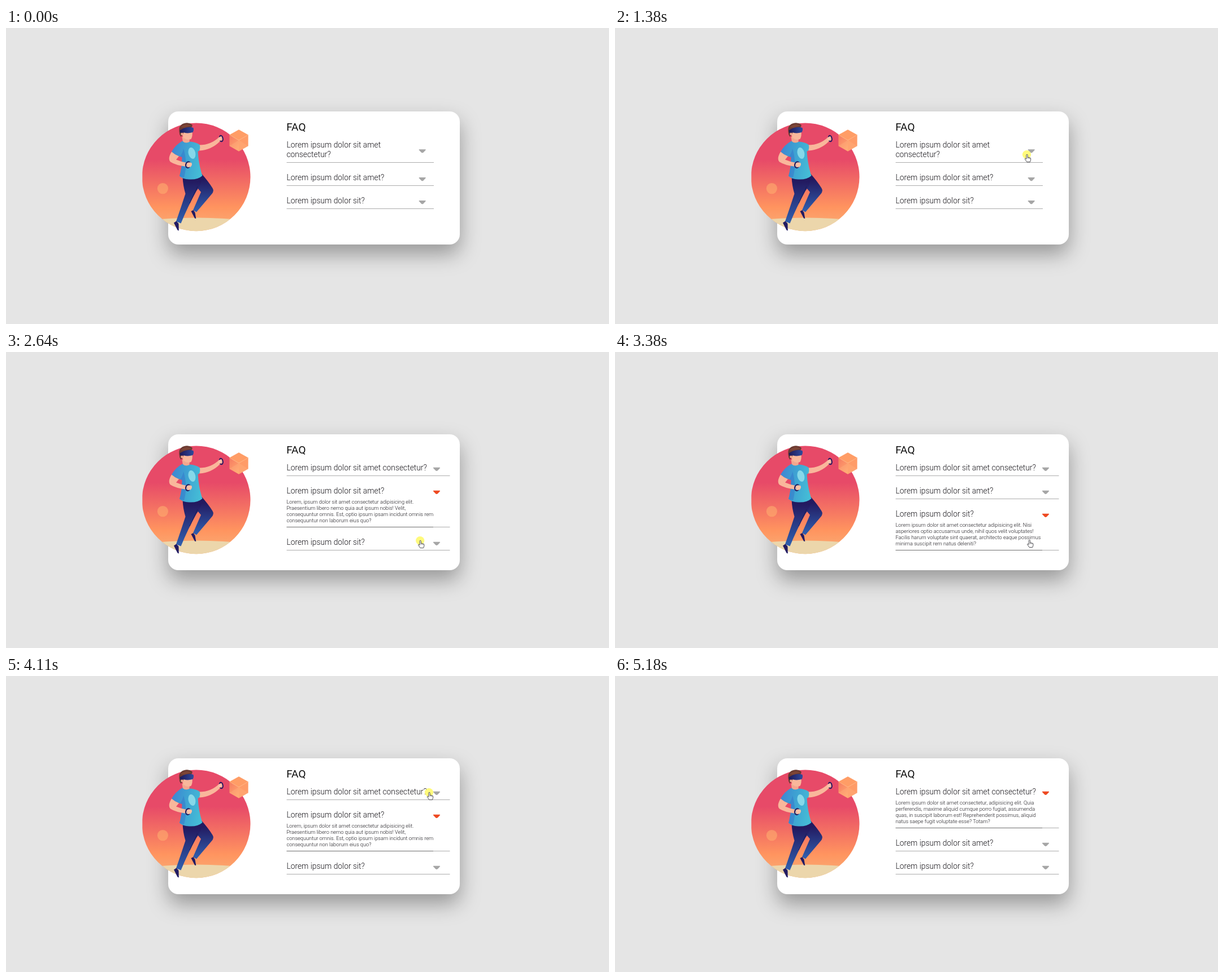
Recreate the animation shown at these times as an HTML page. Size 1067 by 525 pixels, loop 6.11 s.

```html
<!DOCTYPE html>
<html lang="en">
<head>
<meta charset="utf-8">
<title>FAQ accordion</title>
<style>
  html, body { margin: 0; width: 100%; height: 100%; overflow: hidden; background: #e5e5e5; }
  #card {
    position: absolute; left: 287.2px; width: 515.5px; border-radius: 18px;
    background: #fff; box-shadow: 0 17px 36px rgba(0, 0, 0, .34);
  }
  svg { position: absolute; left: 0; top: 0; display: block; }
  text { font-family: Roboto, "Open Sans", sans-serif; font-weight: 300; fill: #17151a; }
  .title { font-size: 19px; font-weight: 400; fill: #0c0c0c; }
  .ask { font-size: 13.82px; }
  .reply { font-size: 9.22px; }
</style>
</head>
<body>
<div id="card"></div>
<svg width="1067" height="525" viewBox="0 0 1067 525">
  <defs>
    <linearGradient id="sky" x1="0" y1="0" x2="0" y2="1">
      <stop offset=".34" stop-color="#e74a68"/><stop offset=".78" stop-color="#ff945f"/><stop offset="1" stop-color="#f9b078"/>
    </linearGradient>
    <linearGradient id="shirt" x1="0" y1=".3" x2="1" y2=".5">
      <stop offset="0" stop-color="#3f86d2"/><stop offset=".4" stop-color="#3d9fd2"/><stop offset="1" stop-color="#45bdd6"/>
    </linearGradient>
    <linearGradient id="legs" x1="0" y1="0" x2="0" y2="1">
      <stop offset=".15" stop-color="#231a60"/><stop offset="1" stop-color="#3060b0"/>
    </linearGradient>
    <linearGradient id="visor">
      <stop offset="0" stop-color="#1d1859"/><stop offset="1" stop-color="#304a9c"/>
    </linearGradient>
    <linearGradient id="side" x1="0" y1="0" x2=".6" y2="1">
      <stop offset="0" stop-color="#f67c62"/><stop offset="1" stop-color="#ffa56e"/>
    </linearGradient>
    <clipPath id="edge"><rect x="241.3" y="160" width="195" height="205"/></clipPath>
    <clipPath id="disc"><circle cx="336.6" cy="264.3" r="95.9"/></clipPath>
  </defs>

  <g id="art">
    <g clip-path="url(#edge)">
      <circle cx="336.6" cy="264.3" r="95.9" fill="url(#sky)"/>
      <ellipse cx="337" cy="357" rx="125" ry="20.5" fill="#ecd6ab" clip-path="url(#disc)"/>
      <circle cx="277.4" cy="284.6" r="9.6" fill="#ffb070" opacity=".57"/>
    </g>
    <!-- cube -->
    <path d="M412 180.3L428.6 189.6 412 199 395.4 189.6z" fill="#ff9d66"/>
    <path d="M395.4 189.6L412 199V218.8L395.4 209.3z" fill="url(#side)"/>
    <path d="M428.6 189.6L412 199V218.8L428.6 209.3z" fill="#ff9c68"/>
    <path d="M395.4 209.3L412 199 428.6 209.3 412 218.8z" fill="#ffbd86" opacity=".25"/>
    <path d="M395.4 189.6L412 199 428.6 189.6" fill="none" stroke="#ffb682" stroke-width=".7"/>
    <!-- legs and shoes -->
    <path d="M329 262L346.5 259Q358 272 365.5 284Q368.5 289 364.5 294L337 326.5 331 323 345 291 334 278z" fill="url(#legs)"/>
    <path d="M312.5 263Q330 271 346.5 259Q348 276 337 289Q322 316 309.5 346.5L301 343Q309 320 317.5 294Q313 279 312.5 263z" fill="url(#legs)"/>
    <path d="M339 281Q332 296 325 311" fill="none" stroke="#1b1856" stroke-width=".8"/>
    <path d="M297 345.5L301.5 342.5 305.5 347 305.8 359.5 303.5 358.5z" fill="#221b62"/>
    <path d="M327.5 325L331.5 323 334.5 327.5 336.3 338 334 337.5z" fill="#221b62"/>
    <!-- far arm -->
    <path d="M341 207.5Q362 208 377 193.5L382 192 383.5 198 378.5 201Q364 216 342.5 217.5z" fill="#f9b79b"/>
    <ellipse cx="380.7" cy="196" rx="3" ry="5.3" fill="none" stroke="#221b62" stroke-width="2" transform="rotate(-10 381 196)"/>
    <path d="M376 194.5Q379 191.5 381.5 194.5L380 199.5 376.5 200z" fill="#ffc4aa"/>
    <!-- torso -->
    <path d="M311.5 193L325 192 324.5 203Q319 208 313 202z" fill="#f3a78e"/>
    <path d="M312 200.5Q318 206 325.5 201.5Q337 202.500 342.5 207Q344.5 212 342 217.5L339.5 219Q341 243 347.5 262Q339 269.5 324 268.5Q312 268 307 262.5Q312 246 311.5 229L308 228Q300 226 293 219.5Q300 207 312 200.5z" fill="url(#shirt)"/>
    <path d="M308 228Q313 221 314 214Q322 240 315 265Q310 264 307 262.5Q312 246 311.5 229z" fill="#3574c9" opacity=".5"/>
    <ellipse cx="329" cy="222" rx="6.2" ry="10.2" fill="#86d8e9" transform="rotate(-14 329 222)"/>
    <!-- near arm -->
    <path d="M293 219.5Q299 225 306 227.500L301 233.500Q310 237.500 320 239L320 246Q300 243.500 291 237.500Q285.500 232 293 219.500z" fill="#f9b79b"/>
    <ellipse cx="322.3" cy="242.5" rx="4" ry="5.3" fill="none" stroke="#221b62" stroke-width="2.2" transform="rotate(18 322 242)"/>
    <path d="M320 240Q324 237 328.5 239.5Q330 243 326.5 246.5L321 247z" fill="#ffc0a6"/>
    <!-- head -->
    <path d="M311 183L329.5 183Q330.5 192 327.5 197Q320 200 313.5 194z" fill="#f9b79b"/>
    <path d="M306.5 184Q305 174 312.5 170Q322 166 329.5 171.5Q330.5 174 328 176.5L316 178 313.5 188 309.5 193Q306.5 189 306.5 184z" fill="#6a3a31"/>
    <path d="M309 176Q318 168 328 173L316 177z" fill="#7d4536"/>
    <path d="M307.5 181.5L315 177.5Q324 174.5 331.5 177Q333 181 330.5 185Q322 187.5 315 185.5L308.5 186z" fill="url(#visor)"/>
    <circle cx="311.5" cy="188" r="2.2" fill="#f3a78e"/>
  </g>

  <text id="title" class="title" x="496.2">FAQ</text>
  <g id="list"></g>
  <g id="cursor">
    <circle id="halo" r="7.6" fill="#fffa7c"/>
    <g id="hand" fill="#fff" stroke="#26262c" stroke-width=".8" stroke-linejoin="round">
      <path d="M-.6 1a1.150 1.150 0 0 1 2.300 0v4q1-.6 1.900.3q1.100-.5 1.800.5q1.700-.3 1.700 1.400v2.500l-1.200 3.400h-5.600l-3.400-5q-.4-1.400 1.200-1.200l1.300 1.200z"/>
      <path d="M1.7 5v2.1M3.600 5.300v1.900M5.400 5.800v1.600" fill="none" stroke-width=".6"/>
    </g>
    <path id="pointer" d="M0 0v9.800l2.300-2.100 1.500 3.400 1.500-.7-1.500-3.300h3.100z" fill="#fff" stroke="#222" stroke-width=".7"/>
  </g>
</svg>

<script>
const LOOP = 6110, LEFT = 496.6;
const $ = id => document.getElementById(id);

const faq = [
  ["Lorem ipsum dolor sit amet consectetur?", [
    "Lorem ipsum dolor sit amet consectetur, adipisicing elit. Quia",
    "perferendis, maxime aliquid cumque porro fugiat, assumenda",
    "quas, in suscipit laborum est! Reprehenderit possimus, aliquid",
    "natus saepe fugit voluptate esse? Totam?"]],
  ["Lorem ipsum dolor sit amet?", [
    "Lorem, ipsum dolor sit amet consectetur adipisicing elit.",
    "Praesentium libero nemo quia aut ipsum nobis! Velit,",
    "consequuntur omnis. Est, optio ipsum ipsam incidunt omnis rem",
    "consequuntur non laborum eius quo?"]],
  ["Lorem ipsum dolor sit?", [
    "Lorem ipsum dolor sit amet consectetur adipisicing elit. Nisi",
    "asperiores optio accusamus unde, nihil quos velit voluptates!",
    "Facilis harum voluptate sint quaerat, architecto eaque possimus",
    "minima suscipit rem natus deleniti?"]]
];

// time, opened item
const clicks = [[0, -1], [1450, 0], [2110, 1], [2710, 2], [3780, 1], [4180, 0]];
// highlight on, off
const halos = [[1310, 1450], [2050, 2110], [2640, 2710], [3713, 3780], [4050, 4180]];
// start, end, steps, x, y
const moves = [
  [190, 790, 9, 690, 239],
  [860, 1310, 7, 728.5, 224.5],
  [1580, 1910, 6, 737.5, 297],
  [2250, 2640, 7, 732.7, 334.5],
  [3380, 3980, 10, 748.5, 208.5],
  [4050, 4050, 1, 748.5, 206.5],
  [4850, 5180, 6, 1020, 517]
];

const text = (cls, y, s) => `<text class="${cls}" x="${LEFT - .2}" y="${y}">${s}</text>`;
const rule = (y, right, color) =>
  `<path d="M${LEFT} ${y}H${right}" stroke="${color}" stroke-width="1"/>`;
const arrow = (x, y, color) =>
  `<path d="M${x - 5.3} ${y - 2.2}h10.6L${x + 1.3} ${y + 2}q-1.3 1-2.6 0z" fill="${color}" stroke="${color}" stroke-width="1.6" stroke-linejoin="round"/>`;

function listMarkup(open) {
  const closed = open < 0, right = closed ? 757 : 785.5;
  let base = closed ? 211.7 : 209.7, out = "";
  faq.forEach(([ask, reply], i) => {
    let mark = base - 2;
    if (closed && i === 0) {
      const cut = ask.lastIndexOf(" ");
      out += text("ask", base, ask.slice(0, cut));
      base += 17.3;
      mark = base - 10.8;
      out += text("ask", base, ask.slice(cut + 1));
    } else out += text("ask", base, ask);
    out += arrow(right - 20.3 - (closed ? 0 : 3.2), mark, i === open ? "#ee4a22" : "#a6a6a6");
    if (i === open) {
      reply.forEach((line, n) => out += text("reply", base + 18.7 + n * 10.9, line));
      base += 50;
    }
    const y = Math.floor(base + 9.5) + .5;
    out += rule(y, right, "#acacac");
    if (i === open) out += rule(y, 756, "#6e6e6e");
    base += 41;
  });
  return out;
}

let shown;
function layout(open) {
  if (open === shown) return;
  shown = open;
  const closed = open < 0, dy = closed ? 0 : -2;
  $("card").style.top = (closed ? 147.7 : 145.9) + "px";
  $("card").style.height = (closed ? 236.7 : 240.9) + "px";
  $("art").setAttribute("transform", `translate(0 ${dy})`);
  $("title").setAttribute("y", 182.2 + dy);
  $("list").innerHTML = listMarkup(open);
}

const ease = p => p * p * p * (p * (p * 6 - 15) + 10);

function cursorAt(t) {
  let x = 1028, y = 516;
  for (const [from, to, n, nx, ny] of moves) {
    if (t < from) break;
    const k = t >= to ? n : Math.floor((t - from) / (to - from) * (n - 1)) + 1;
    const p = ease(k / n);
    x += (nx - x) * p;
    y += (ny - y) * p;
  }
  return [x, y];
}

const show = (id, on) => $(id).setAttribute("visibility", on ? "visible" : "hidden");

function draw(t) {
  layout(clicks.filter(c => c[0] <= t).pop()[1]);
  const [x, y] = cursorAt(t), on = t >= 190 && t < 5180;
  const overList = x < (shown < 0 ? 757 : 786) && y < 352;
  $("cursor").setAttribute("transform", `translate(${x} ${y})`);
  show("hand", on && overList);
  show("pointer", on && !overList);
  show("halo", halos.some(([a, b]) => t >= a && t < b));
}

const start = performance.now();
function tick() {
  draw((performance.now() - start) % LOOP);
  requestAnimationFrame(tick);
}
draw(0);
requestAnimationFrame(tick);
</script>
</body>
</html>
```
